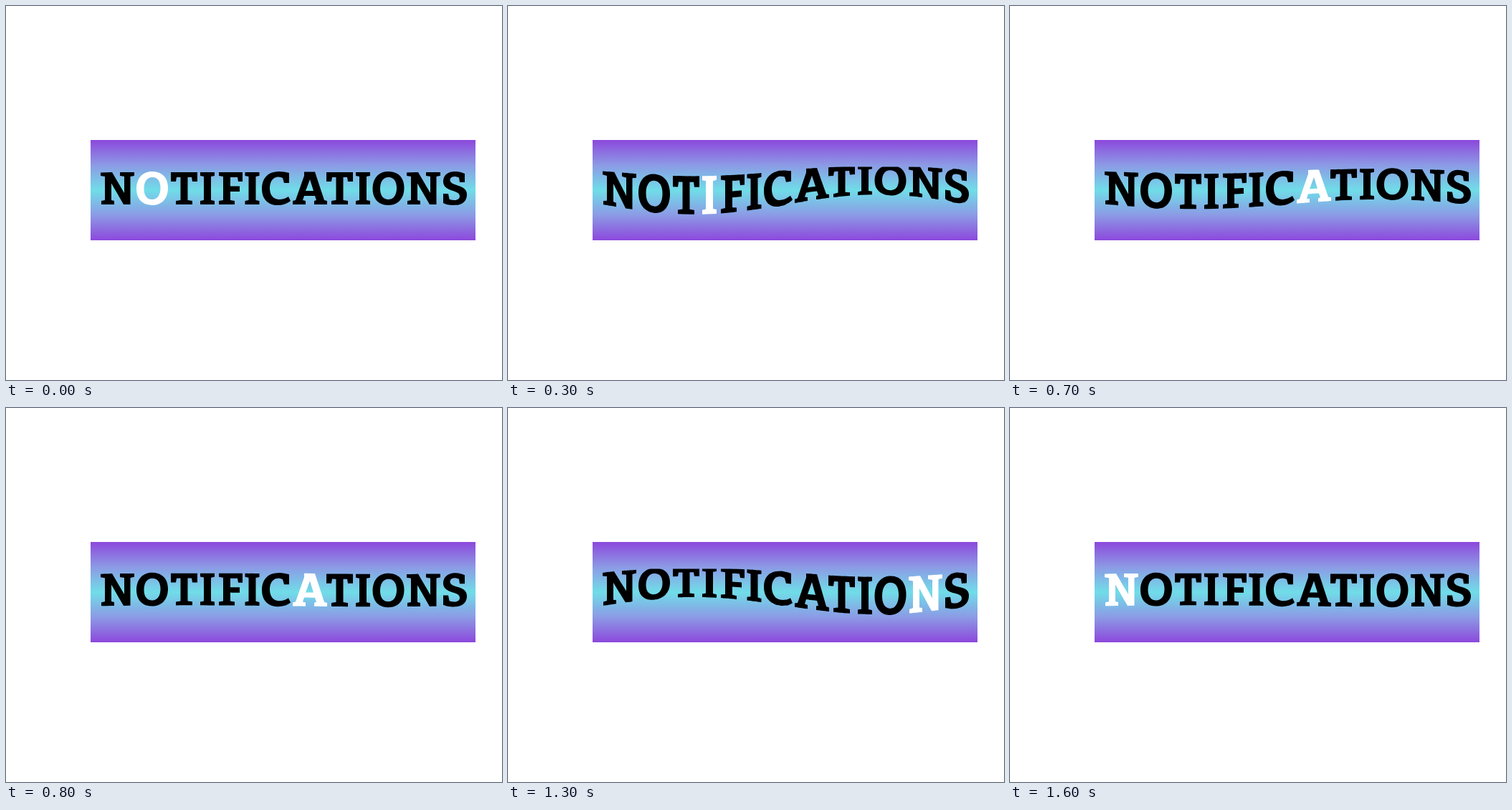
An HTML page without scripts that plays this animation: 692x522 px, repeating every 1700 ms.

```html
<!DOCTYPE html>
<html lang="en">
<head>
<meta charset="utf-8">
<title>Notifications</title>
<style>
  @property --hot  { syntax: "<number>"; inherits: true; initial-value: 1; }
  @property --bend { syntax: "<number>"; inherits: true; initial-value: 0; }
  @property --lift { syntax: "<number>"; inherits: true; initial-value: 0; }

  html, body { margin: 0; width: 100%; height: 100%; overflow: hidden; background: #fff; }
  svg { display: block; width: 692px; height: 522px; animation: wave 1700ms step-end infinite; }

  /* The letter whose index equals --hot is white, all others black. */
  .letter {
    --gap: calc(var(--hot) - var(--k));
    --v: calc(255 * max(0, 1 - max(var(--gap), -1 * var(--gap))));
    fill: rgb(var(--v), var(--v), var(--v));
  }

  /* One 8px column of the word, sheared and scaled along a sine of one period.
     Bending also makes the letters a little taller from the baseline up. */
  .strip {
    --i: calc(8 * var(--r) + var(--c));
    --left: calc(8px * var(--i));
    --angle: calc(5.625deg * (var(--i) + 0.5));
    --grow: calc(var(--bend) * sin(var(--angle)));
    --slope: calc(var(--bend) * 0.91 * cos(var(--angle)));
    --tall: calc(0.3 * max(var(--bend), -1 * var(--bend)));
    clip-path: inset(0 calc(504px - var(--left)) 0 var(--left));
    transform: matrix(1, var(--slope), 0, calc(1 + var(--grow) + var(--tall)), 0,
      calc(var(--lift) - 181 * var(--grow) - 277 * var(--tall) - var(--slope) * (136 + 8 * var(--i))));
  }

  @keyframes wave {
    0%     { --hot: 1;  --bend: 0;     --lift: 0; }
    11.76% { --hot: 2;  --bend: .1;    --lift: 0; }
    17.64% { --hot: 3;  --bend: .144;  --lift: 0; }
    23.52% { --hot: 4;  --bend: .144;  --lift: 0; }
    29.41% { --hot: 5;  --bend: .144;  --lift: 0; }
    35.29% { --hot: 6;  --bend: .135;  --lift: 0; }
    41.17% { --hot: 7;  --bend: .07;   --lift: -.4; }
    47.05% { --hot: 7;  --bend: -.01;  --lift: -.7; }
    52.94% { --hot: 8;  --bend: -.065; --lift: -.8; }
    58.82% { --hot: 8;  --bend: -.115; --lift: -1; }
    64.70% { --hot: 9;  --bend: -.122; --lift: -1; }
    70.58% { --hot: 10; --bend: -.126; --lift: -1; }
    76.47% { --hot: 11; --bend: -.126; --lift: -1; }
    82.35% { --hot: 12; --bend: -.126; --lift: -1; }
    88.23% { --hot: 12; --bend: -.065; --lift: -.8; }
    94.11%, 100% { --hot: 0; --bend: -.01; --lift: -.7; }
  }
</style>
</head>
<body>
<svg viewBox="0 0 692 522" role="img" aria-label="NOTIFICATIONS">
  <defs>
    <linearGradient id="sky" x2="0" y2="1">
      <stop stop-color="#8c48dc"/>
      <stop offset=".25" stop-color="#8c9ae5"/>
      <stop offset=".5" stop-color="#70dde8"/>
      <stop offset=".75" stop-color="#8c9ae5"/>
      <stop offset="1" stop-color="#8c48dc"/>
    </linearGradient>
    <clipPath id="frame"><rect x="118" y="224.5" width="537" height="102"/></clipPath>

    <path id="N" d="M132 232.5L148 232L165 261V238L159 237V232H179V237L173.5 238V277H164L147 247.5V271L151 272V277H133V272L138 271V238L132 237Z"/>
    <path id="O" fill-rule="evenodd" d="M204 231C218 231 226 240 226 254S218 278 204 278S182 269 182 255S190 231 204 231ZM204 239C197 239 192.5 245 192.5 255S197 270 204 270S215.5 264 215.5 254S211 239 204 239Z"/>
    <path id="T" d="M230 232H267V245H260L259 239H253.5V271L260 272V277H237V272L243.5 271V239H238L237 245H230Z"/>
    <path id="I" d="M271 232H291V237L286 238V271L291 272V277H271V272L276 271V238L271 237Z"/>
    <path id="F" d="M297 232H330V245H324L323 239H313V251.5H326V259H313V271L319 272V277H297V272L303 271V238L297 237Z"/>
    <path id="C" d="M395 233V247H388L386 240C384 239 382 238.5 380 238.5C372.5 238.5 368 245 368 254C368 264 373 270 381 270C386 270 390 268.5 394 266L397 272C392 276 386 278 379 278C365 278 357 269 357 255C357 240 366 231 381 231C386 231 391 232 395 233Z"/>
    <path id="A" fill-rule="evenodd" d="M416 231.5H431L444 271L448 272V277H430V272L433 271L431 265H416L414 271L418 272V277H400V272L404 271L416 237ZM418 258H429L424 242Z"/>
    <path id="S" d="M640 234V246H633L632 239.5C630 238.5 628 238 626 238C622 238 619.5 240 619.5 243C619.5 247 624 248.5 630 250.5C638 253 643 256 643 263C643 273 636 278 625 278C619 278 614 277 610 275V262H617L618.5 269.5C620 270.5 622.5 271 625 271C630 271 633 269 633 265.5C633 261 628 259.5 622 257.5C615 255 610 252 610 245C610 236 617 231 626 231C631 231 636 232 640 234Z"/>

    <g id="word">
      <!-- fixes the box that the column clips measure from -->
      <rect x="132" y="150" width="512" height="200" fill="none"/>
      <use class="letter" href="#N" style="--k:0"/>
      <use class="letter" href="#O" style="--k:1"/>
      <use class="letter" href="#T" style="--k:2"/>
      <use class="letter" href="#I" style="--k:3"/>
      <use class="letter" href="#F" style="--k:4"/>
      <use class="letter" href="#I" x="62.5" style="--k:5"/>
      <use class="letter" href="#C" style="--k:6"/>
      <use class="letter" href="#A" style="--k:7"/>
      <use class="letter" href="#T" x="217" style="--k:8"/>
      <use class="letter" href="#I" x="217" style="--k:9"/>
      <use class="letter" href="#O" x="329.5" style="--k:10"/>
      <use class="letter" href="#N" x="427" style="--k:11"/>
      <use class="letter" href="#S" style="--k:12"/>
    </g>

    <g id="block">
      <use class="strip" href="#word" style="--c:0"/>
      <use class="strip" href="#word" style="--c:1"/>
      <use class="strip" href="#word" style="--c:2"/>
      <use class="strip" href="#word" style="--c:3"/>
      <use class="strip" href="#word" style="--c:4"/>
      <use class="strip" href="#word" style="--c:5"/>
      <use class="strip" href="#word" style="--c:6"/>
      <use class="strip" href="#word" style="--c:7"/>
    </g>
  </defs>

  <rect x="118" y="187" width="537" height="140" fill="url(#sky)"/>
  <g clip-path="url(#frame)">
    <use href="#block" style="--r:0"/>
    <use href="#block" style="--r:1"/>
    <use href="#block" style="--r:2"/>
    <use href="#block" style="--r:3"/>
    <use href="#block" style="--r:4"/>
    <use href="#block" style="--r:5"/>
    <use href="#block" style="--r:6"/>
    <use href="#block" style="--r:7"/>
  </g>
</svg>
</body>
</html>
```
